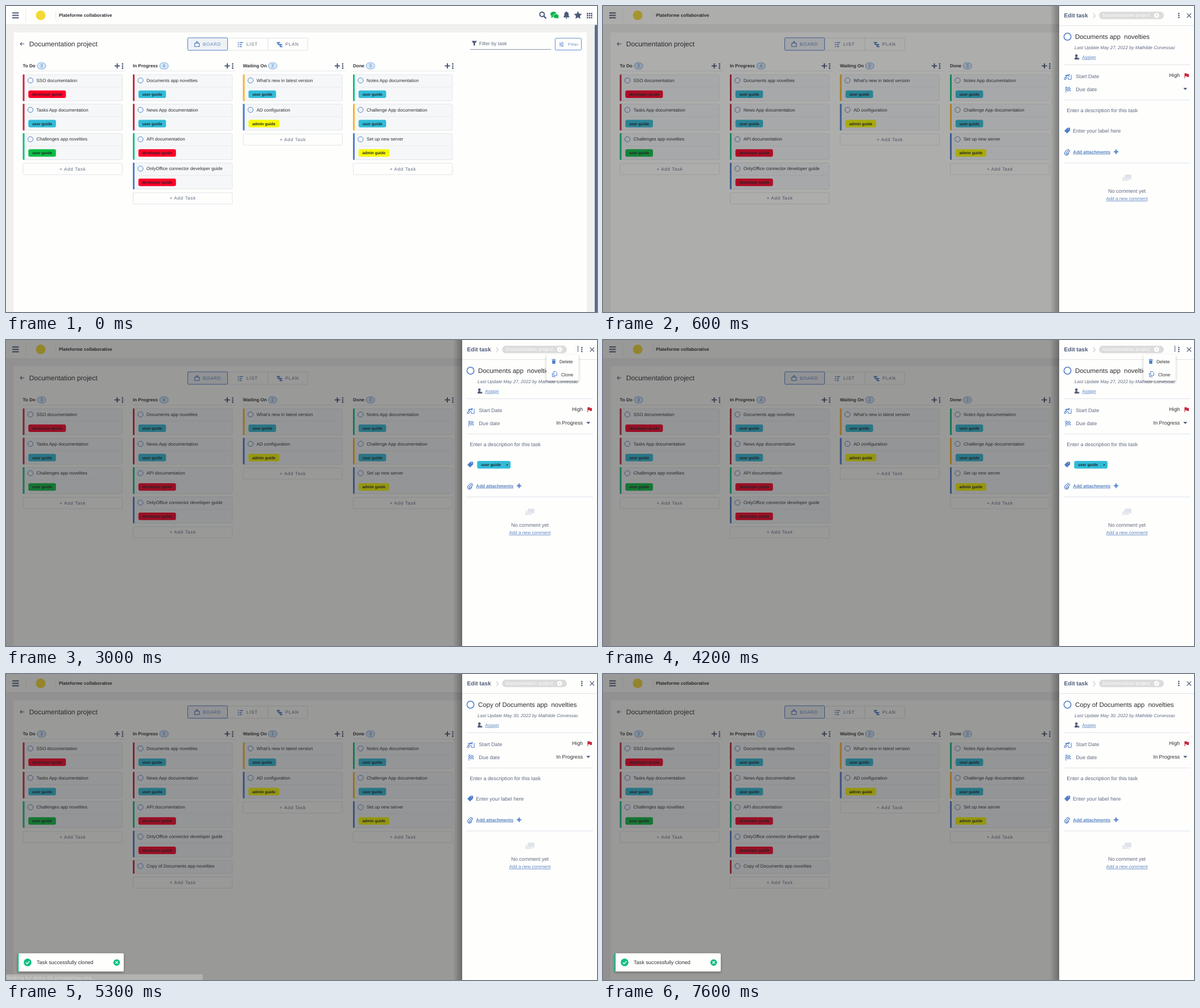
These frames come from a looping animation (1039x539 px, 8000 ms). An HTML page:

```html
<!DOCTYPE html>
<html lang="en">
<head>
<meta charset="utf-8">
<title>Task board</title>
<style>
  html, body { margin: 0; width: 100%; height: 100%; overflow: hidden; background: #f0f0ef; }
  svg { display: block; width: 100%; height: 100%; }
  text { font-family: "Liberation Sans", Arial, sans-serif; text-rendering: geometricPrecision; white-space: pre; }
</style>
</head>
<body>
<svg id="stage" viewBox="0 0 1039 539"></svg>
<script>
const INK = '#2f2f33', SLATE = '#4d5a78', BLUE = '#4f7ec8', GREY = '#5f6880', WHITE = '#fefefd', LINE = '#dde0e4';
const RED = '#c7283e', GREEN = '#10bf82', ORANGE = '#fab52c', LINK = '#5a84c2';
const BOLD = 'font-weight="700"', MID = 'text-anchor="middle"', UNDER = 'text-decoration="underline"';
const CAPS = 'letter-spacing=".71"';

// y is the visual middle of the line
const text = (x, y, s, size = 8, fill = INK, extra = '') =>
  `<text x="${x}" y="${y + size * 0.35}" font-size="${size}" fill="${fill}" ${extra}>${s}</text>`;
const rect = (x, y, w, h, fill, extra = '') =>
  `<rect x="${x}" y="${y}" width="${w}" height="${h}" fill="${fill}" ${extra}/>`;
const circle = (x, y, r, fill, extra = '') =>
  `<circle cx="${x}" cy="${y}" r="${r}" fill="${fill}" ${extra}/>`;
const path = (d, fill, extra = '') => `<path d="${d}" fill="${fill}" ${extra}/>`;
const stroke = (d, color, w = 1, extra = '') =>
  path(d, 'none', `stroke="${color}" stroke-width="${w}" ${extra}`);
const group = (id, body, extra = '') => `<g id="${id}" ${extra}>${body}</g>`;
const border = (color, w = 1, r = 2) => `stroke="${color}" stroke-width="${w}" rx="${r}"`;
const plus = (x, y, r, color, w) => stroke(`M${x - r} ${y}h${2 * r}M${x} ${y - r}v${2 * r}`, color, w);
const cross = (x, y, r, color, w) =>
  stroke(`M${x - r} ${y - r}l${2 * r} ${2 * r}m0 ${-2 * r}l${-2 * r} ${2 * r}`, color, w);
const dots = (x, y, gap, r, color) => [-gap, 0, gap].map(d => circle(x, y + d, r, color)).join('');
const cells = (n, fn) => Array.from({ length: n * n }, (_, i) => fn(i % n, Math.floor(i / n))).join('');

const TAGS = {
  dev: ['developer guide', '#fe0229', 66],
  user: ['user guide', '#31bcd9', 48.5],
  green: ['user guide', '#0cbd45', 48.5],
  admin: ['admin guide', '#f6f903', 54],
};

const COLUMNS = [
  ['To Do', 3, 33, [['SSO documentation', RED, 'dev'], ['Tasks App documentation', RED, 'user'],
    ['Challenges app novelties', GREEN, 'green']]],
  ['In Progress', 4, 54.8, [['Documents app novelties', RED, 'user'], ['News App documentation', RED, 'user'],
    ['API documentation', GREEN, 'dev'], ['OnlyOffice connector developer guide', BLUE, 'dev']]],
  ['Waiting On', 2, 52.3, [["What's new in latest version", ORANGE, 'user'], ['AD configuration', BLUE, 'admin']]],
  ['Done', 3, 30.7, [['Notes App documentation', GREEN, 'user'], ['Challenge App documentation', ORANGE, 'user'],
    ['Set up new server', BLUE, 'admin']]],
];

function card(x, y, [title, color, tag]) {
  const h = tag ? 46 : 23;
  let s = rect(x + 0.5, y + 0.5, 174.3, h, '#f5f7f8', border('#dfe3e6', 0.9)) +
    rect(x, y, 3, h + 1, color, 'rx="1"') +
    circle(x + 13.4, y + 10.6, 4.6, 'none', `stroke="${BLUE}" stroke-width="1"`) +
    text(x + 24, y + 10.5, title);
  if (tag) {
    const [name, fill, w] = TAGS[tag];
    s += stroke(`M${x + 10} ${y + 22.5}h162`, '#e3e7e9', 0.8) +
      rect(x + 9.8, y + 28.2, w, 13.2, fill, 'rx="3"') +
      text(x + 9.8 + w / 2, y + 34.8, name, 6.9, '#24242a', BOLD + ' ' + MID);
  }
  return s;
}

const addTask = (x, y) => rect(x + 0.5, y - 9.8, 174.3, 20, WHITE, border('#dcdfe2', 0.9)) +
  text(x + 87.8, y, '+ Add Task', 8, GREY, MID + ' ' + CAPS);

const count = (x, n) => rect(x - 7.5, 100, 15, 11, '#d5e7f8', border('#6f9fd6', 0.9, 5.5)) +
  text(x, 105.6, n, 8, BLUE, MID);

const columns = COLUMNS.map(([name, n, cx, tasks], i) => {
  const x = 29.5 + 193.5 * i, end = 235 + 51.8 * (tasks.length - 2);
  let s = text(x, 105, name, 8, INK, BOLD) + plus(x + 166, 105.5, 4.6, SLATE, 2) +
    dots(x + 175.4, 105.8, 3.7, 1.4, SLATE) + stroke(`M${x} 114.5h180`, '#e2e4e6', 0.9) +
    tasks.map((t, k) => card(x, 120.5 + 51.8 * k, t)).join('');
  if (i !== 1) return s + count(x + cx, n) + addTask(x, end);
  return s + group('before', count(x + cx, 4) + addTask(x, end)) +
    group('after', count(x + cx, 5) + card(x, 327.7, ['Copy of Documents app novelties', RED]) + addTask(x, 367));
}).join('');

const star = 'M' + Array.from({ length: 10 }, (_, i) => {
  const a = i * Math.PI / 5, r = i % 2 ? 3.6 : 7.4;
  return `${(1005.5 + r * Math.sin(a)).toFixed(2)} ${(16.4 - r * Math.cos(a)).toFixed(2)}`;
}).join('L') + 'Z';

const header = rect(0, 0, 1039, 33, WHITE) + rect(0, 32.5, 1039, 1, '#e6e6e5') +
  stroke('M11 12.2h11.5M11 16.5h11.5M11 20.8h11.5', SLATE, 2) +
  stroke('M34.5 5v23M87.5 9v15', '#e6e8ea', 0.9) +
  circle(61, 16.5, 8.5, '#f3d935') +
  text(93, 16.5, 'Plateforme collaborative', 8.05, INK, BOLD) +
  circle(942.4, 14.8, 4, 'none', `stroke="${SLATE}" stroke-width="2"`) +
  stroke('M945.4 17.8l3.6 3.6', SLATE, 2.4, 'stroke-linecap="round"') +
  path('M958 20.5l1.5-4h4v3z', '#0cb649') + '<ellipse cx="962.5" cy="14.3" rx="5.3" ry="4.4" fill="#0cb649"/>' +
  `<ellipse cx="967" cy="18" rx="5" ry="4" fill="#0cb649" stroke="${WHITE}" stroke-width=".9"/>` +
  path('M968 20l3.5 2.8-.6-4z', '#0cb649') +
  path('M979.6 20c1.6-1.3 1.9-3 1.9-5.2a3.8 4.3 0 0 1 7.6 0c0 2.2.3 3.9 1.9 5.2zM983.7 20.8h3.2a1.6 1.7 0 0 1-3.2 0zM984.6 9.6h1.4v2h-1.4z', SLATE) +
  path(star, SLATE) +
  cells(3, (i, j) => rect(1021 + 3.6 * i, 12 + 3.6 * j, 2.5, 2.5, SLATE, 'rx=".5"'));

const toolbar = stroke('M32 66.8h-7m3-3l-3 3 3 3', SLATE, 1.1) +
  text(40.8, 66.8, 'Documentation project', 12, INK) +
  rect(389.5, 56.5, 141, 21.5, WHITE, border('#dcdfe3', 0.9)) + stroke('M460.5 56.5v21.5', '#dcdfe3', 0.9) +
  rect(319.5, 56, 70, 22, '#eff2f5', border(BLUE, 1, 1.5)) +
  stroke('M331.8 65.5h8v6h-8zM333.5 65l2.3-2.5 2.3 2.5', BLUE, 1.2) +
  stroke('M407.5 64.5h2m1.3 0h6M407.5 68h2m1.3 0h4M407.5 71.5h2m1.3 0h4', BLUE, 1.7) +
  stroke('M476 64.5h6M478.5 68h7M481.5 71.5h4.5M478.5 64v4M482 68v4', BLUE, 2) +
  text(346, 67.3, 'BOARD', 8, LINK, CAPS) + text(422.8, 67.3, 'LIST', 8, GREY, CAPS) +
  text(491, 67.3, 'PLAN', 8, GREY, CAPS) +
  path('M818.5 61.5h9.5l-3.6 4.6v4.2l-2.4-1.4v-2.8z', SLATE) +
  text(831.8, 66, 'Filter by task', 8.6, GREY) + stroke('M816 76.5h142', '#7c87a0', 0.9) +
  rect(965.5, 56.8, 46, 20.8, WHITE, border(BLUE, 0.9)) +
  stroke('M972.5 65h8M972.5 67.7h8M972.5 70.4h8', BLUE, 0.8) +
  stroke('M978 63.9v2.2M975 66.6v2.2M978 69.3v2.2', BLUE, 1.1) +
  text(988.3, 67.3, 'Filter', 7, LINK, 'letter-spacing=".45"');

const board = rect(0, 0, 1039, 539, '#f0f0ef') + header +
  rect(13.5, 46.5, 1007.5, 500, WHITE) + toolbar + columns +
  rect(1035, 33, 4, 510, '#5b6a88', 'rx="2"');

const task = (title, date) => text(830, 53.8, title, 11.4, INK) +
  text(829, 73.5, `Last Update ${date}, 2022 by Mathilde Corvessac`, 8, GREY, 'font-style="italic"');

const checker = cells(4, (i, j) => (i + j) % 2 ? '' : rect(814.5 + 1.9 * i, 142.6 + 1.9 * j, 1.9, 1.9, BLUE));

const menu = rect(950.3, 25.5, 56.3, 46, WHITE, 'rx="2" filter="url(#lift)"') +
  path('M959.5 35.2h7v-1.1h-2l-.5-.7h-2l-.5.7h-2zM960 36h6l-.5 6h-5z', BLUE) +
  text(973, 38.2, 'Delete', 8.1) +
  stroke('M962.8 55.5h3.4l2.2 2.2v5h-5.6zM960.6 57.8v7h5.6', BLUE, 1) +
  text(976, 61, 'Clone', 8.1);

const drawer = rect(786, 0, 16, 539, 'url(#shade)') + rect(802, 0, 260, 539, WHITE) +
  text(810.5, 16.2, 'Edit task', 10.1, SLATE, BOLD) + stroke('M861.8 13l3.6 4.2-3.6 4.2', '#a9b0bc', 1) +
  rect(872, 10, 114, 13.3, '#dcdcdc', 'rx="6.6"') +
  text(878.3, 16.6, 'Documentation project', 8, WHITE, 'letter-spacing=".15"') +
  circle(973.3, 16.6, 4.4, WHITE) + cross(973.3, 16.6, 1.6, '#cfcfcf', 0.9) +
  dots(1012.3, 16.7, 3.5, 1.3, SLATE) + cross(1030.3, 16.8, 3.7, SLATE, 1.2) +
  stroke('M802 34.5h237M810 103.5h222M810 165.5h222M810 276.5h222', LINE, 0.9) +
  circle(816.6, 54, 6.2, 'none', `stroke="${BLUE}" stroke-width="1.5"`) +
  group('first', task('Documents app&nbsp; novelties', 'May 27')) +
  group('copy', task('Copy of Documents app&nbsp; novelties', 'May 30')) +
  circle(832.2, 87.6, 2.3, SLATE) + path('M829 94.3c0-3 1-4.3 3.2-4.3s2.4 1.2 3 2.2v2.1zM835.3 91.5h2v2.8h-2z', SLATE) +
  text(842.3, 90, 'Assign', 8.1, LINK, UNDER) +
  stroke('M810 129.3h4l1-3h3v3h5.2v-8', BLUE, 1) +
  stroke('M811 128l3-3.4 3-3 2.6 2.4M812.4 122.6l4.6-1', BLUE, 1.4) + circle(819.3, 121.2, 1.2, BLUE) +
  text(831.3, 124.3, 'Start Date', 9.1, GREY) +
  checker + stroke('M813.8 142v10.6', BLUE, 1) + text(831.3, 147, 'Due date', 9.1, GREY) +
  text(1014, 122, 'High', 9.1, INK, 'text-anchor="end"') +
  path('M1022.3 118.5h4l.5 1.2h3.2v5.2h-3.2l-.5-1.2h-3v3.6h-1z', RED) +
  group('status', text(1014, 146, 'In Progress', 9.1, INK, 'text-anchor="end"')) +
  path('M1020.2 144.3h7l-3.5 3.6z', SLATE) +
  text(815.2, 183.4, 'Enter a description for this task', 9.1, GREY) +
  path('M811 219.8l5.5-5.3h4.7v4.7l-5.5 5.4zM819 215.8a.8.8 0 1 0 .1 1.5', BLUE) +
  group('hint', text(826, 219.8, 'Enter your label here', 9.1, GREY)) +
  group('chip', rect(828.3, 213, 58.7, 13.6, '#31bcd9', 'rx="3"') +
    text(835.2, 219.7, 'user guide', 6.9, '#24242a', BOLD) + cross(881, 220, 1.6, INK, 0.9)) +
  stroke('M818.5 254.5l-4.2 4.3a1.3 1.3 0 0 0 1.9 1.8l3.2-3.6a2.5 2.5 0 0 0-3.8-3.5l-3.6 4.1a3.3 3.3 0 0 0 4.8 4.4l2.5-2.8', BLUE, 1.1) +
  text(826.3, 256.8, 'Add attachments', 8.1, LINK, BOLD + ' ' + UNDER) + plus(902, 256.8, 4, BLUE, 2) +
  path('M913.5 301.5v8l2.2-1.7h9.3v-2.3h-8.5v-4z', '#dfe4ea') +
  path('M918.5 297h9a1.4 1.4 0 0 1 1.4 1.4v8.6l-2.3-2.2h-8.1a1.4 1.4 0 0 1-1.4-1.4v-5a1.4 1.4 0 0 1 1.4-1.4z', '#dfe4ea') +
  text(921, 326.3, 'No comment yet', 9.1, GREY, MID) +
  text(921, 339.3, 'Add a new comment', 8, LINK, MID + ' ' + UNDER) +
  group('menu', menu) + group('caret', rect(1005, 10, 1, 11, SLATE));

const toast = rect(20, 492, 187, 32, WHITE, 'rx="2" filter="url(#lift)"') + rect(20, 492, 2.2, 32, GREEN) +
  circle(38, 508, 6.8, GREEN) + stroke('M34.8 508.2l2.3 2.3 4.2-4.4', WHITE, 1.5) +
  text(54, 508, 'Task successfully cloned', 9.1, INK) +
  circle(194.6, 508.2, 5.8, GREEN) + cross(194.6, 508.2, 2.2, WHITE, 1.2);

const loading = rect(0, 529, 346, 12, '#b2b2b0', 'rx="2"') +
  text(2, 535.2, 'Waiting for demo-04.ormaplateau.org…', 8.3, '#d9d9d7',
    `style="font-family:'Noto Sans',sans-serif"`);

document.getElementById('stage').innerHTML = `<defs>
  <linearGradient id="shade"><stop offset="0" stop-color="#000" stop-opacity="0"/><stop offset="1" stop-color="#000" stop-opacity=".3"/></linearGradient>
  <filter id="lift" x="-20%" y="-30%" width="140%" height="170%"><feDropShadow dx="0" dy="2" stdDeviation="2" flood-color="#000" flood-opacity=".28"/></filter>
  </defs>` + board + group('overlay', rect(0, 0, 1039, 539, '#212121')) + group('drawer', drawer) +
  group('toast', toast) + group('loading', loading);

const LOOP = 8000;
const start = document.timeline.currentTime ?? performance.now();

// Each row is [time, value]; a value holds until the next row.
function hold(id, prop, rows) {
  const frames = rows.map(([t, v]) => ({ offset: t / LOOP, [prop]: v, easing: 'step-end' }));
  frames.push({ offset: 1, [prop]: rows[rows.length - 1][1] });
  const anim = document.getElementById(id).animate(frames, { duration: LOOP, iterations: Infinity });
  anim.startTime = start;
}
const fade = (id, ...rows) => hold(id, 'opacity', rows);
const slide = (id, ...rows) => hold(id, 'transform', rows.map(([t, x]) => [t, `translate(${x}px, 0px)`]));
const blink = (id, first, ...times) => fade(id, [0, first], ...times.map((t, i) => [t, (first + i + 1) % 2]));

fade('overlay', [0, 0], [500, 0.19], [600, 0.37], [700, 0.44], [800, 0.46]);
slide('drawer', [0, 260], [500, 54], [600, 0]);
blink('status', 0, 1000);
blink('chip', 0, 1500, 5100);
blink('hint', 1, 1500, 5100);
fade('menu', [0, 0], [2000, 0.35], [2100, 0.75], [2200, 0.95], [2300, 1], [4800, 0.55], [4900, 0.08], [5000, 0]);
slide('menu', [0, 0], [4800, 8], [5000, 0]);
blink('caret', 0, 1900, 2400, 3000, 3600, 4200, 4500, 5700, 6300, 6900, 7600);
for (const id of ['before', 'first']) blink(id, 1, 5100);
for (const id of ['after', 'copy']) blink(id, 0, 5100);
blink('toast', 0, 5200);
blink('loading', 0, 5200, 5400);
</script>
</body>
</html>
```
